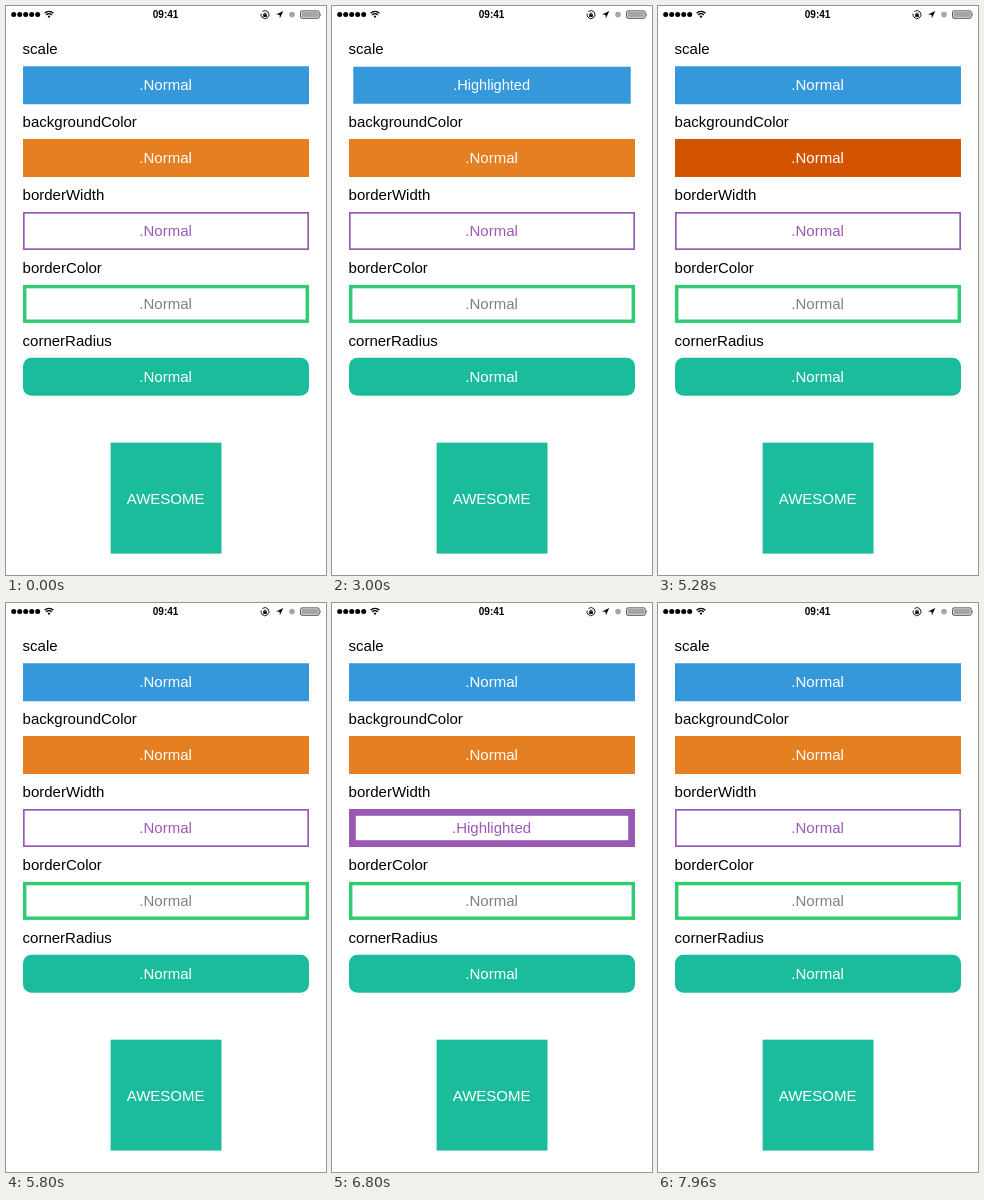
Write an HTML page with a canvas that moves like this. It is 320 px wide and 569 px high and loops after 8 s.

```html
<!DOCTYPE html>
<html lang="en">
<head>
<meta charset="utf-8">
<title>Button states</title>
<style>
  html, body { margin: 0; width: 100%; height: 100%; overflow: hidden; background: #fff; }
  canvas { display: block; width: 320px; height: 569px; }
</style>
</head>
<body>
<canvas id="stage"></canvas>
<script>
const W = 320, H = 569, LOOP = 8000, FADE = 200;
const FONT = '"Liberation Sans", Arial, sans-serif';
const canvas = document.getElementById('stage');
const ctx = canvas.getContext('2d');
const dpr = window.devicePixelRatio || 1;
canvas.width = Math.round(W * dpr);
canvas.height = Math.round(H * dpr);

const LEFT = 17, WIDTH = 286, HEIGHT = 38, TOP = 60.2, PITCH = 72.9;
const buttons = [
  { label: 'scale', fill: [52, 152, 219], text: '#fff', press: [2760, 3640], scale: 0.97 },
  { label: 'backgroundColor', fill: [230, 126, 34], pressedFill: [211, 84, 0], text: '#fff', press: [4640, 5275] },
  { label: 'borderWidth', border: 1.7, pressedBorder: 6.8, stroke: '#9b59b6', text: '#9b59b6', press: [6360, 7160] },
  { label: 'borderColor', border: 3.4, stroke: '#2ecc71', text: '#808080' },
  { label: 'cornerRadius', fill: [26, 188, 156], radius: 8.5, text: '#fff' }
];

const mix = (a, b, k) => a + (b - a) * k;
const ease = k => {
  k = Math.min(1, Math.max(0, k));
  return k * k * (3 - 2 * k);
};

function pressAmount(press, t) {
  if (!press) return 0;
  return ease((t - press[0]) / FADE) - ease((t - press[1]) / FADE);
}

function write(str, x, y, color, align = 'left', font = '15px') {
  ctx.font = font + ' ' + FONT;
  ctx.textAlign = align;
  ctx.fillStyle = color;
  ctx.fillText(str, x, y);
}

function disc(x, y, r, color) {
  ctx.fillStyle = color;
  ctx.beginPath();
  ctx.arc(x, y, r, 0, Math.PI * 2);
  ctx.fill();
}

function arc(x, y, r, from, to, width) {
  ctx.lineWidth = width;
  ctx.beginPath();
  ctx.arc(x, y, r, from * Math.PI, to * Math.PI);
  ctx.stroke();
}

function drawStatusBar() {
  ctx.strokeStyle = '#000';
  for (let i = 0; i < 5; i++) disc(7.7 + i * 6, 8.6, 2.5, '#000');

  // signal strength
  arc(43, 11.6, 6.2, 1.25, 1.75, 1.4);
  arc(43, 11.6, 3.8, 1.25, 1.75, 1.4);
  ctx.fillStyle = '#000';
  ctx.beginPath();
  ctx.moveTo(43, 12.2);
  ctx.arc(43, 11.6, 1.9, 1.25 * Math.PI, 1.75 * Math.PI);
  ctx.fill();

  write('09:41', 159.6, 12.3, '#000', 'center', 'bold 10px');

  // rotation lock
  arc(259, 8.6, 4, -0.72, 1.08, 0.9);
  ctx.fillStyle = '#000';
  ctx.fillRect(257.2, 8.2, 3.6, 2.7);
  arc(259, 8.2, 1.2, 1, 2, 0.8);

  // location arrow
  ctx.beginPath();
  ctx.moveTo(277.3, 5);
  ctx.lineTo(273.9, 12.3);
  ctx.lineTo(273.5, 8.8);
  ctx.lineTo(270, 8.4);
  ctx.fill();

  disc(286, 8.6, 2.8, '#a5a5a5');

  // battery
  ctx.lineWidth = 0.7;
  ctx.beginPath();
  ctx.roundRect(294.6, 4.9, 18.6, 7.4, 1.4);
  ctx.stroke();
  ctx.fillRect(295.6, 5.9, 16.6, 5.4);
  ctx.fillRect(313.9, 7.3, 1.2, 2.6);
}

function drawButton(b, i, t) {
  const top = TOP + i * PITCH, cx = LEFT + WIDTH / 2, cy = top + HEIGHT / 2;
  const k = pressAmount(b.press, t);
  const held = b.press && t >= b.press[0] && t < b.press[1];

  write(b.label, LEFT - 0.4, 48 + i * 73, '#000');

  ctx.save();
  const s = mix(1, b.scale || 1, k);
  ctx.translate(cx, cy);
  ctx.scale(s, s);
  ctx.translate(-cx, -cy);
  if (b.fill) {
    const to = b.pressedFill || b.fill;
    ctx.fillStyle = 'rgb(' + b.fill.map((c, n) => Math.round(mix(c, to[n], k))) + ')';
    ctx.beginPath();
    ctx.roundRect(LEFT, top, WIDTH, HEIGHT, b.radius || 0);
    ctx.fill();
  }
  if (b.border) {
    const w = mix(b.border, b.pressedBorder || b.border, k);
    ctx.lineWidth = w;
    ctx.strokeStyle = b.stroke;
    ctx.strokeRect(LEFT + w / 2, top + w / 2, WIDTH - w, HEIGHT - w);
  }
  write(held ? '.Highlighted' : '.Normal', 159.6, cy + 5.2, b.text, 'center');
  ctx.restore();
}

function draw() {
  const t = performance.now() % LOOP;
  ctx.setTransform(dpr, 0, 0, dpr, 0, 0);
  ctx.fillStyle = '#fff';
  ctx.fillRect(0, 0, W, H);
  drawStatusBar();
  buttons.forEach((b, i) => drawButton(b, i, t));
  ctx.fillStyle = 'rgb(26,188,156)';
  ctx.fillRect(104.6, 436.7, 110.9, 110.9);
  write('AWESOME', 159.6, 497.6, '#fff', 'center');
  requestAnimationFrame(draw);
}
draw();
</script>
</body>
</html>
```
